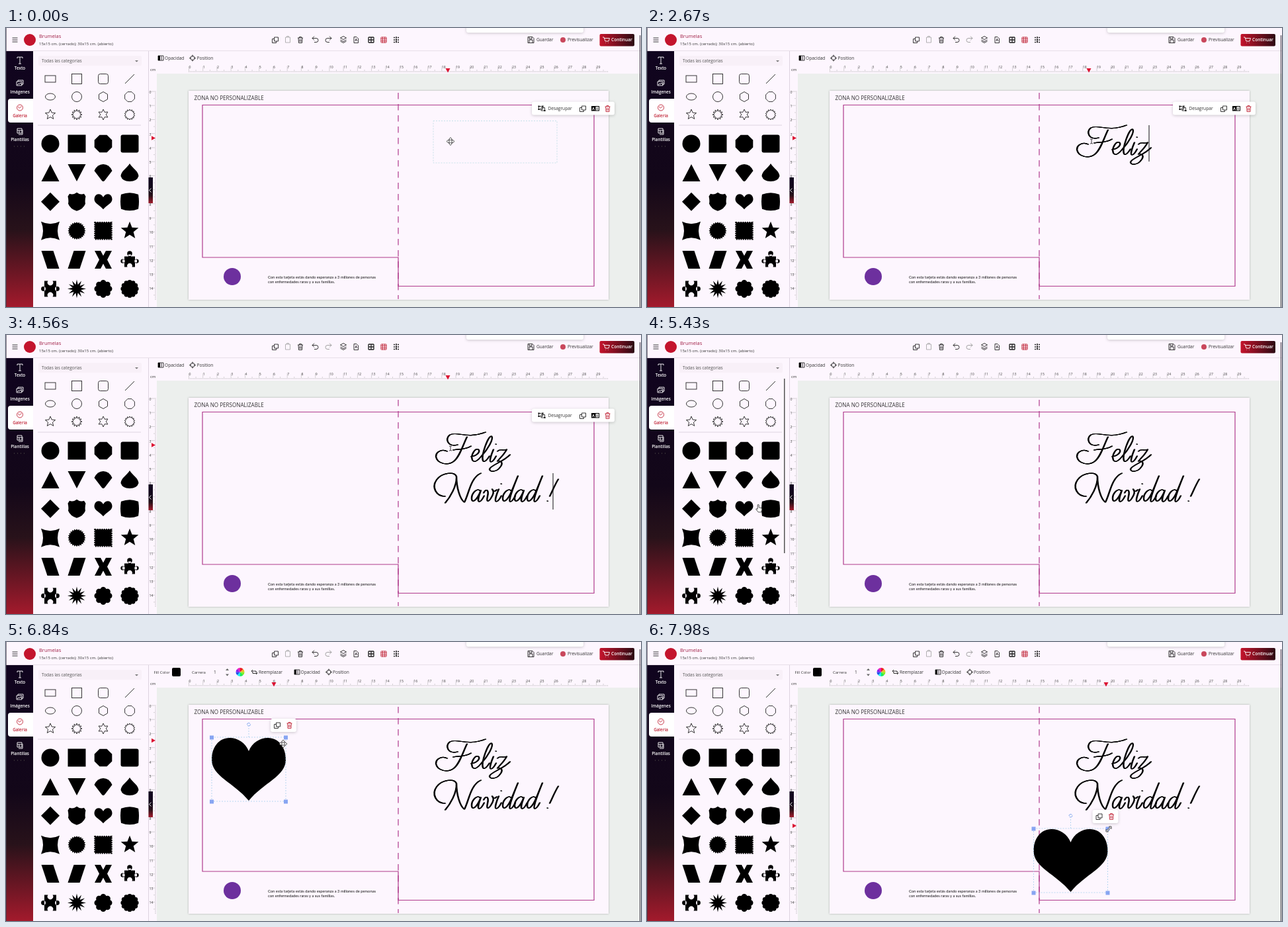
An HTML page for the animation above (8 s loop, 960 by 422 pixels).

```html
<!DOCTYPE html>
<html lang="es">
<head>
<meta charset="utf-8">
<title>Editor de tarjetas</title>
<style>
  html, body { margin: 0; width: 100%; height: 100%; overflow: hidden; background: #fdf6fe; }
  svg { display: block; width: 100vw; height: 100vh; }
  text { font: 6.6px "Open Sans", sans-serif; fill: #333; }
  .line { fill: none; stroke: #222; stroke-width: .9; }
  .red { stroke: #c02437; }
  .float { fill: #fff; filter: drop-shadow(0 1px 2px #0003); }
  .ruler text { font-size: 5.2px; fill: #444; }
  .tab text { font-size: 6.3px; font-weight: 600; fill: #fff; text-anchor: middle; }
  .tab .line { stroke: #fff; }
  .note text { font: 5.8px Lato, sans-serif; fill: #111; }
  .script { fill: none; stroke: #000; stroke-width: 1.15; stroke-linecap: round; stroke-linejoin: round; }
</style>
</head>
<body>
<svg viewBox="0 0 960 422">
  <defs>
    <linearGradient id="side" x2="0" y2="1">
      <stop stop-color="#10041f"/><stop offset=".5" stop-color="#130719"/>
      <stop offset=".7" stop-color="#28121a"/><stop offset="1" stop-color="#a31a2c"/>
    </linearGradient>
    <linearGradient id="button"><stop stop-color="#c5142c"/><stop offset="1" stop-color="#2c0a13"/></linearGradient>
    <path id="copy" d="M-1.5-4h6v6h-6zM-1.5-1.5h-3v6h6v-2.500"/>
    <path id="trash" d="M-4-3h8M-1.500-3v-1.500h3v1.500M-3-3l.5 7.500h5l.5-7.500M-1-1v4M1-1v4"/>
    <path id="heart" d="M56 21C61 8 73 1 85 1C101 1 112 15 112 34C112 59 78 69 56 96C34 69 0 59 0 34C0 15 11 1 27 1C39 1 51 8 56 21Z"/>
    <g id="opacity"><path class="line" d="M-4-3.500h8v7h-8z"/><path d="M-4-3.500h3v7h-3z"/><path class="line" d="M1-3v6"/></g>
    <g id="target" class="line"><circle r="3.200"/><path d="M-5 0h3M2 0h3M0-5v3M0 2v3"/></g>
  </defs>

  <!-- header -->
  <path d="M0 34.500H960" stroke="#e8dfe8"/>
  <path class="line" d="M9.500 15h8M9.500 18h8M9.500 21h8"/>
  <circle cx="36" cy="18" r="9" fill="#c3142d"/>
  <text x="50" y="15" style="font-size:7.500px;fill:#a01f45">Brumelas</text>
  <text x="50" y="26" style="font-size:6px">15x15 cm. (cerrado); 30x15 cm. (abierto)</text>
  <g class="line">
    <use href="#copy" x="407" y="18"/>
    <path stroke="#aaa" d="M422.500 14h7v8h-7zM424.500 14v-1.500h3v1.500"/>
    <use href="#trash" x="445" y="18"/>
    <path d="M466 12.500l-3 3 3 3M463 15.500h6a3 3 0 0 1 0 6h-3"/>
    <path id="redo" d="M489 12.500l3 3-3 3M492 15.500h-6a3 3 0 0 0 0 6h3"/>
    <path d="M505.500 15l4.500-2.500 4.500 2.500-4.500 2.500zM505.500 18l4.500 2.500 4.500-2.500M505.500 20l4.500 2.500 4.500-2.500"/>
    <path d="M526 13.500h4l2.500 2.500v6.500h-6.500zM528 20l1.300-4 1.300 4"/>
    <path stroke-width="1.300" d="M548 14h8M548 18h8M548 22h8M548 14v8M552 14v8M556 14v8"/>
    <path class="red" d="M567 14h8v8h-8zM566.500 16.500h9M566.500 19.500h9M569.500 13.500v9M572.500 13.500v9"/>
    <path stroke-width="1.500" stroke-dasharray="2 1" d="M586 14.500h8M586 18h8M586 21.500h8M590 13v9"/>
  </g>
  <rect class="float" x="696" y="-8" width="177" height="15" rx="3"/>
  <g id="actions">
    <path class="line" d="M789 13.500h7l2 2v7h-9zM791 13.500v3h4v-3M791 22v-4h5v4"/>
    <text x="802" y="20.300">Guardar</text>
    <circle cx="842" cy="18" r="4" fill="#c9485c"/>
    <text x="849" y="20.300">Previsualizar</text>
    <rect x="897.500" y="9" width="52.500" height="18.500" rx="2" fill="url(#button)"/>
    <path class="line" style="stroke:#fff" d="M902 14h2l2 6h5l1.500-4.500h-8M906.500 22.500h.5M910.500 22.500h.5"/>
    <text x="915" y="20.300" style="font-weight:600;fill:#fff">Continuar</text>
  </g>

  <!-- navigation -->
  <rect y="35" width="41" height="387" fill="url(#side)"/>
  <path d="M41 107H7q-4 0-4 4v28q0 4 4 4H41z" fill="#fff"/>
  <g class="tab">
    <path class="line" stroke-width="1.300" d="M17 46v-2h8v2M21 44v10M19 54h4"/>
    <text x="21" y="63">Texto</text>
    <path class="line" d="M16 81h8v6h-8zM18 81v-2h8v6h-2M17 86l2-2 1 1 2-2 2 3"/>
    <text x="21" y="99">Imágenes</text>
    <path class="line" style="stroke:#c02437" d="M21 116a4.500 4.500 0 1 0 4.500 4.500a4.500 4.500 0 0 0-4.500-4.500M18 119l2.500 2 3-2.500"/>
    <text x="21" y="135" style="fill:#c02437">Galería</text>
    <path class="line" d="M17 152h7v7h-7zM17 155h7M20 155v4M25 154v7h-6"/>
    <text x="21" y="171">Plantillas</text>
    <path class="line" style="stroke:#665" stroke-dasharray="1 4" d="M12 179h19"/>
  </g>

  <!-- gallery -->
  <rect x="49" y="42" width="156" height="15" rx="2" fill="#f8f0f8"/>
  <text x="54" y="52" style="font-size:6.500px;fill:#555">Todas las categorías</text>
  <path d="M195 49h5l-2.500 2.500z" fill="#777"/>
  <path d="M48 147h156" stroke="#ded5e0"/>
  <path d="M215.500 35V422" stroke="#ddd3df"/>
  <g id="outlines" class="line"></g>
  <g id="solids"></g>
  <rect id="scrollbar" x="207" y="66" width="1.500" height="264" fill="#555"/>
  <g id="tooltip"><rect class="float" x="134" y="281" width="25" height="12" rx="2"/>
    <text x="137.500" y="289" style="font-size:5.500px">P8.svg</text></g>

  <!-- workspace -->
  <rect x="228" y="69" width="732" height="353" fill="#ecefed"/>
  <text x="218" y="65" style="font-size:6px">cm</text>
  <g id="ruler" class="ruler"></g>
  <g id="markers" fill="#dc1433"><path id="markerX" d="M-3.500 61h7L0 67.500z"/><path id="markerY" d="M220-3.300v6.600L226 0z"/></g>
  <path d="M222 226h-6.500v39H222z" fill="url(#side)"/>
  <path class="line" style="stroke:#fff" d="M219.500 242.500l-3 3 3 3"/>
  <rect x="276" y="95" width="635" height="316" fill="#fdf6fe" style="filter:drop-shadow(0 0 1.500px #0004)"/>
  <text x="284.500" y="109" style="font-size:8.100px">ZONA NO PERSONALIZABLE</text>
  <g fill="none" stroke="#b03a8c" stroke-width="1.200">
    <path d="M297 116.500H889V390.500H593V347H297z"/>
    <path d="M593 98V410" stroke-dasharray="9.500 7.500"/>
  </g>
  <circle cx="342" cy="376" r="13" fill="#6d309e"/>
  <g class="note">
    <text x="396" y="379">Con esta tarjeta estás dando esperanza a 3 millones de personas</text>
    <text x="396" y="385.500">con enfermedades raras y a sus familias.</text>
  </g>

  <!-- option bars -->
  <g id="textBar">
    <use href="#opacity" x="234" y="45.500"/><text x="240" y="48">Opacidad</text>
    <use href="#target" x="282" y="45.500"/><text x="288.500" y="48">Position</text>
  </g>
  <g id="shapeBar">
    <text x="223.500" y="47.500" style="font-size:6px">Fill Color</text>
    <rect x="251" y="39" width="13" height="13" rx="2"/>
    <text x="281" y="47.500" style="font-size:6px">Carrera</text><text x="314" y="48">1</text>
    <path d="M332 43l2.500-3 2.500 3zM332 48.500l2.500 3 2.500-3z" fill="#666"/>
    <g id="wheel"></g>
    <path class="line" d="M373 42l-2 2 2 2M371 44h7v2M378 45l2 2-2 2M380 47.500h-7v-2"/>
    <text x="382" y="48" style="font-size:6.500px">Reemplazar</text>
    <use href="#opacity" x="440" y="45.500"/><text x="445.500" y="48">Opacidad</text>
    <use href="#target" x="488" y="45.500"/><text x="494" y="48">Position</text>
  </g>

  <!-- card content -->
  <rect id="textFrame" x="646" y="140.500" width="187" height="63.500" fill="none" stroke="#b8dce4" stroke-width=".8" stroke-dasharray="2 2"/>
  <g id="lettering" class="script" role="img" aria-label="Feliz Navidad!"></g>
  <rect id="caret" width="1" height="55" fill="#111"/>
  <g id="groupBar">
    <rect class="float" x="795" y="111.500" width="125" height="20" rx="3"/>
    <path class="line" d="M805.500 118.500h6v4.500h-6zM809 120.500h5.500v4.500h-5.500z"/>
    <path d="M804.500 117.500h2v2h-2zM810.500 117.500h2v2h-2zM804.500 122h2v2h-2zM813.500 124h2v2h-2z"/>
    <text x="819.500" y="124">Desagrupar</text>
    <use href="#copy" class="line" x="872" y="122"/>
    <rect x="885" y="118" width="12" height="7.500"/>
    <text x="886" y="124" style="font-size:5.500px;font-weight:700;fill:#fff">A</text>
    <path d="M891.500 119h4.500v5.500h-4.500z" fill="#fff"/><path class="line" d="M892.500 121h2.500M892.500 123h2.500"/>
    <use href="#trash" class="line red" x="909.500" y="122"/>
  </g>
  <g id="shape">
    <use href="#heart" x="311" y="144"/>
    <path d="M367 130v14M311 144H423V241H311z" fill="none" stroke="#a5d0ee" stroke-width=".8" stroke-dasharray="2 2"/>
    <path d="M308 141.500h6v6h-6zM420 141.500h6v6h-6zM308 238.500h6v6h-6zM420 238.500h6v6h-6z" fill="#87a5f2"/>
    <path class="line" style="stroke:#6f9bea" d="M364.500 125a2.500 2.500 0 0 1 4.500-1.500M369.500 124.500a2.500 2.500 0 0 1-4.500 1.500"/>
    <rect class="float" x="400" y="116" width="39" height="20" rx="3"/>
    <use href="#copy" class="line" x="410" y="126"/><use href="#trash" class="line red" x="428.500" y="126"/>
  </g>

  <g id="pointer" stroke-linejoin="round">
    <path id="moveCursor" d="M0-6l2.500 3H1v2h2v-1.500L6 0 3 2.500V1H1v2h1.500L0 6l-2.500-3H-1V1h-2v1.500L-6 0l3-2.500V-1h2v-2h-1.500z" fill="#fff" stroke="#333" stroke-width=".8"/>
    <path id="textCursor" class="line" d="M-2-3.500q2 0 2 1v5q0 1-2 1M2-3.500q-2 0-2 1M0 2.500q0 1 2 1"/>
    <path id="handCursor" d="M-2.500-5q1-1 2 0v4l4 1q1 .5.500 2.500l-1 3.500h-4.500l-3.500-4.500q0-1.500 2.500 0z" fill="#fff" stroke="#222" stroke-width=".8"/>
    <path id="sizeCursor" d="M4-4v3.500l-1.200-1.200-4.500 4.500L-.5 4H-4V.5l1.200 1.200 4.500-4.500L.5-4z" fill="#fff" stroke="#222" stroke-width=".8"/>
  </g>
  <path d="M958.500 11V422" stroke="#3a3440"/>
  <path d="M.5 0V422" stroke="#3a3040" stroke-width=".6"/>
</svg>
<script>
const LOOP = 8000;
const $ = id => document.getElementById(id);
const show = (id, on) => $(id).style.display = on ? '' : 'none';
const place = (id, x, y) => $(id).setAttribute('transform', `translate(${x} ${y})`);

// Polygon around the origin; alternating radii make stars.
function star(count, outer, inner = outer, turn = 0) {
  const step = outer === inner ? 2 * Math.PI / count : Math.PI / count;
  const corners = outer === inner ? count : count * 2;
  return 'M' + Array.from({length: corners}, (_, i) => {
    const r = i % 2 ? inner : outer, a = i * step - Math.PI / 2 + turn;
    return `${(r * Math.cos(a)).toFixed(2)} ${(r * Math.sin(a)).toFixed(2)}`;
  }).join('L') + 'z';
}
const disc = (x, y, r) => `M${x - r} ${y}a${r} ${r} 0 1 0 ${2 * r} 0a${r} ${r} 0 1 0 ${-2 * r} 0z`;
const scallop = (n, ring, r) => disc(0, 0, ring) + Array.from({length: n}, (_, i) =>
  disc(ring * Math.cos(i * 2 * Math.PI / n), ring * Math.sin(i * 2 * Math.PI / n), r)).join('');

const path = (d, extra = '') => `<path d="${d}" ${extra}/>`;
const square = (s, r = 0) => `<rect x="${-s}" y="${-s}" width="${2 * s}" height="${2 * s}" rx="${r}"/>`;
const grid = (shapes, top, rowStep) => shapes.map((shape, i) =>
  `<g transform="translate(${67 + i % 4 * 40} ${top + (i >> 2) * rowStep})">${shape}</g>`).join('');
const tilt = Math.PI / 8;

$('outlines').innerHTML = grid([
  '<rect x="-8" y="-5" width="16" height="10"/>', square(7.5), square(7.5, 3), path('M-7 7L7-7'),
  '<ellipse rx="7.500" ry="5"/>', '<circle r="7.500"/>', path(star(6, 7.5)), path(star(8, 8, 8, tilt)),
  path(star(5, 8, 3.6)), path(star(12, 8, 5)), path(star(6, 8, 4.2)), path(star(14, 8, 6))
], 77, 27);

$('solids').innerHTML = grid([
  '<circle r="13.500"/>', square(13.5), path(star(8, 14.4, 14.4, tilt)), square(13.5, 3),
  path('M0-13L13.500 13h-27z'), path('M0 13L13.500-13h-27z'),
  path('M-13.500-3Q-9-13 0-13T13.500-3L2 12Q0 14-2 12z'), path('M0-14C4-7 13-3 13.500 5Q11 13 0 13T-13.500 5C-13-3-4-7 0-14z'),
  path('M0-14L14 0 0 14-14 0z'), path('M0-14Q5-10 11-12L13.500-8Q12-2 13 3Q10 11 0 14Q-10 11-13 3Q-12-2-13.500-8L-11-12Q-5-10 0-14z'),
  '<use href="#heart" transform="translate(-13.500 -11.700) scale(.241)"/>',
  path('M-13-11Q0-16 13-11Q15 0 13 11Q0 16-13 11Q-15 0-13-11z'),
  path('M-14-14Q0-7 14-14Q8 0 14 14Q0 7-14 14Q-8 0-14-14z'), path(star(24, 13.5, 11.5)),
  path('M-12.500-12.500h25v25h-25z', 'stroke="#000" stroke-width="2.500" stroke-dasharray="2 1.300"'), path(star(5, 14, 6)),
  path('M-13.500-13.500h18l9 27h-18z'), path('M13.500-13.500h-18l-9 27h18z'),
  path('M-13-13.500h9L0-6l4-7.500h9L6 0l7 13.500H4L0 6l-4 7.500h-9L-6 0z'),
  path('M-8-5H-2V-8H2V-5H8V0H11V4H8V11H3.500A4 4 0 1 0-3.500 11H-8V4H-11V0H-8z' + disc(0, -9.5, 3.8) + disc(10.5, 2, 3.2) + disc(-10.5, 2, 3.2)),
  path('M-9-12H-3.500A4.300 4.300 0 1 0 3.500-12H9V12H3.500A4.300 4.300 0 1 0-3.500 12H-9z' + disc(-10.5, 0, 3.4) + disc(10.5, 0, 3.4)),
  path(star(12, 14, 6.5)), path(scallop(8, 9, 4.5)), path(scallop(12, 10.2, 3.4))
], 175, 43.9);

const UNIT = 21.24;
let ticks = '', labels = '';
for (let i = 0; i <= 298; i++) {
  const h = i % 10 ? (i % 5 ? 2 : 4) : 9, x = 276.5 + i * UNIT / 10, y = 96 + i * UNIT / 10;
  ticks += `M${x.toFixed(1)} 67v${-h}`;
  if (y < 411) ticks += `M227 ${y.toFixed(1)}h${-h}`;
  if (i % 10 === 0) {
    labels += `<text x="${x}" y="61">${i / 10}</text>`;
    if (i < 150) labels += `<text x="216.500" y="${y + 3}">${i / 10}</text>`;
  }
}
$('ruler').innerHTML = path(ticks, 'stroke="#aaa" stroke-width=".5"') + labels;

$('wheel').innerHTML = Array.from({length: 8}, (_, i) =>
  path('M354 45.500v-6.500a6.500 6.500 0 0 1 4.600 1.900z', `fill="hsl(${i * 45} 85% 52%)" transform="rotate(${i * 45} 354 45.500)"`)).join('');

// Handwriting: each letter has [time, x, baseline, strokes, caret x after it].
const bowl = 'M13-16C9-22 0-13 0-5C0 4 8-2 14-17';
const tail = '-2 11 0C14 1 17-5 19-9';
const A = bowl + 'C11-9 8' + tail, D = bowl + 'L23-39C17-24 8' + tail;
const I = 'M7-19C4-12 0-1 3 0C6 0 9-5 11-9M10.500-27l.4.400';
const letters = [
  [1500, 650, 192, 'M47-38C41-26 36-8 27-1C18 6 2 3 0-8C0-16 10-20 17-16M33-26C18-22 13-35 21-41C32-47 46-34 75-45M26-18C34-20 45-18 53-24', 703],
  [1680, 703, 192, 'M0-8C9-9 15-16 11-19C6-21-1-10 2-3C5 3 12-4 16-9', 715],
  [1860, 719, 192, 'M0-9C9-19 19-35 15-39C10-40-1-10 2-2C4 2 9-4 12-9', 727],
  [2050, 730, 192, I, 738],
  [2300, 743, 192, 'M0-16C4-21 9-16 14-19C10-11 4-6 0-1C6-3 9 2 4 8C-1 15-11 16-12 11C-11 5 9 0 19-11', 759],
  [3150, 647, 252, 'M17-8C3-8-4-22 4-33C12-44 31-46 34-38C35-24 24-6 17 2M34-38C34-22 39-4 46 1C53-12 55-36 71-43', 703],
  [3350, 704, 252, A, 721],
  [3520, 721, 252, 'M1-13C6-22 9-16 7-8C5 1 8 1 12-5C16-11 17-16 14-19C16-14 18-15 21-18', 737],
  [3700, 738, 252, I, 746],
  [3850, 751, 252, D, 768],
  [4000, 769, 252, A, 785],
  [4150, 788, 252, D, 803],
  [4400, 815, 252, 'M20-34C15-26 10-14 7-8M3.500-1l.4.400', 827]
];
// Copies side by side imitate a broad nib.
$('lettering').innerHTML = letters.map(([, x, y, d]) =>
  '<g>' + [-.7, 0, .7].map(nib => path(d, `transform="translate(${x + nib} ${y})"`)).join('') + '</g>').join('');
const glyphs = [...$('lettering').children];

const EDIT = 600, NEW_LINE = 2850, DONE = 4950, ADDED = 5900, GRAB = 7040, DROP = 7680;
const route = [[0, 672, 171.5], [DONE, 672, 171.5], [5500, 147, 266], [5980, 147, 266], [6270, 247, 253],
  [6840, 419, 154], [GRAB, 400, 166], [DROP, 673.5, 304], [7880, 698, 283], [LOOP, 698, 283]];

function pointerAt(t) {
  const i = Math.max(1, route.findIndex(p => p[0] >= t));
  const [t0, x0, y0] = route[i - 1], [t1, x1, y1] = route[i];
  const k = (t - t0) / (t1 - t0), ease = k * k * (3 - 2 * k);
  return [x0 + (x1 - x0) * ease, y0 + (y1 - y0) * ease];
}

function draw(now) {
  const t = now % LOOP;
  const editing = t >= EDIT && t < DONE, added = t >= ADDED;
  const [x, y] = pointerAt(t);

  let caretX = 647, caretY = 147;
  letters.forEach(([time, , , , after], i) => {
    glyphs[i].style.display = t >= time ? '' : 'none';
    if (t >= time) caretX = after;
  });
  if (t >= NEW_LINE) {
    caretY = 209;
    if (t < 3150) caretX = 647;
  }
  show('caret', editing);
  place('caret', caretX - .5, caretY);
  show('textFrame', t < EDIT);
  show('groupBar', t < DONE);
  show('textBar', !added);
  show('shapeBar', added);
  show('shape', added);

  const grabbed = pointerAt(GRAB), held = pointerAt(Math.min(Math.max(t, GRAB), DROP));
  place('shape', held[0] - grabbed[0], held[1] - grabbed[1]);

  $('actions').style.opacity = t >= 5950 && t < 6600 ? .45 : 1;
  $('redo').style.stroke = t < EDIT ? '#222' : '#999';
  show('tooltip', t >= 5600 && t < 6400);
  show('scrollbar', t >= 5250 && t < 6400);

  show('markers', x > 276);
  place('markerX', x - (t > 6300 && t < GRAB ? 14 : 4), 0);
  place('markerY', 0, y - 5);

  place('pointer', x, y);
  const hand = t >= DONE && x < 311, sizing = t >= 7820;
  show('textCursor', editing);
  show('handCursor', hand);
  show('sizeCursor', sizing);
  show('moveCursor', !editing && !hand && !sizing);
}

function frame() {
  draw(performance.now());
  requestAnimationFrame(frame);
}
frame();
</script>
</body>
</html>
```
